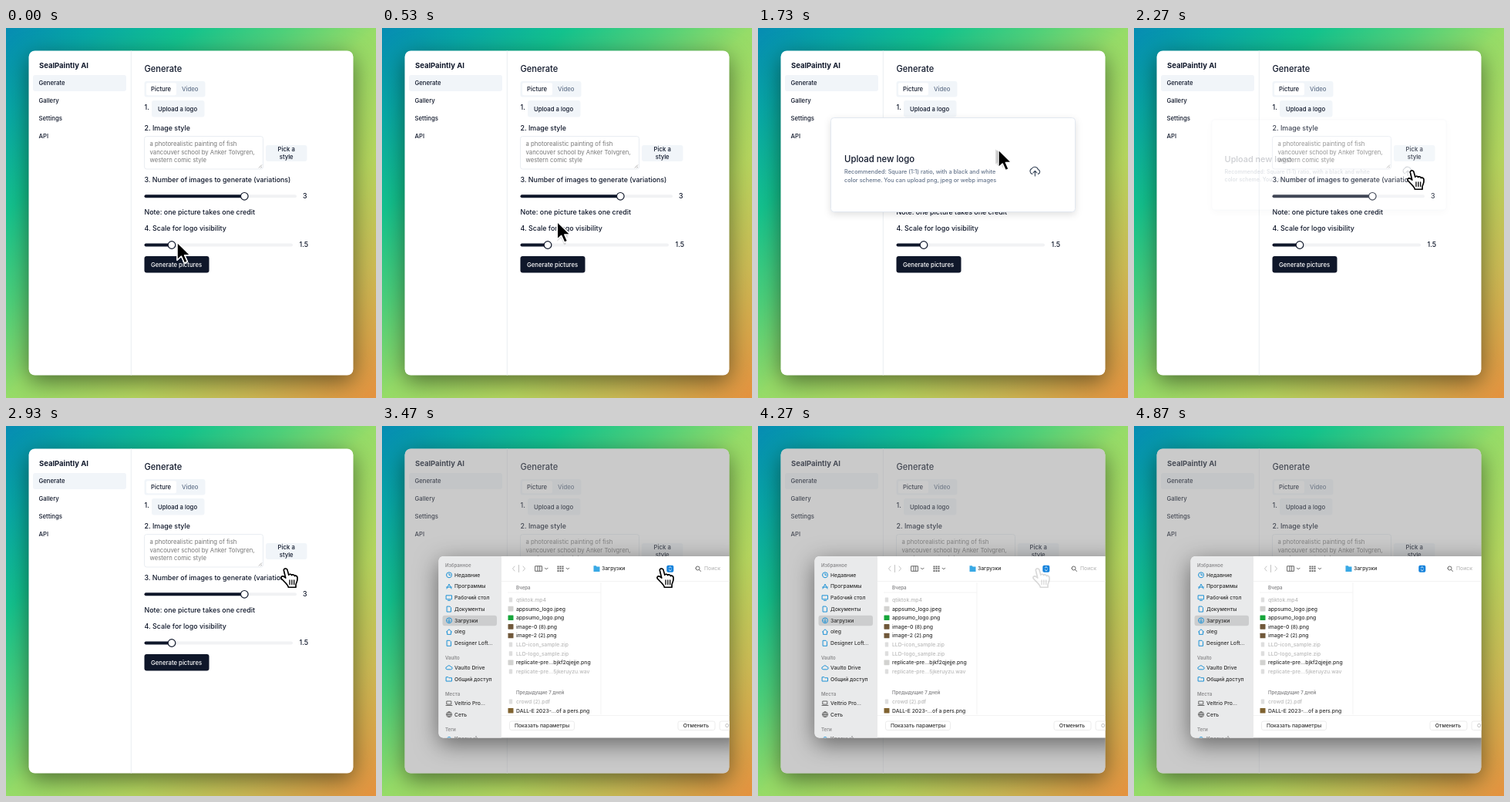
Recreate the animation shown at these times as an HTML page. Size 480x480 px, loop 4940 ms.

```html
<!DOCTYPE html>
<html lang="en">
<head>
<meta charset="utf-8">
<title>Logo picture generator</title>
<style>
  html, body { margin: 0; width: 100%; height: 100%; overflow: hidden; }
  body { background: linear-gradient(135deg, #068cb3 0, #08a8a6 12%, #14c38e 25%, #4fd17a 38%, #96dc68 50%, #b6d75f 67%, #cdbb55 82%, #e5923f 100%); }
  svg { display: block; width: 100%; height: 100%; }
  text { font: 500 7.75px Inter, "Open Sans", sans-serif; fill: #0f172a; white-space: pre; }
  .label text { font-size: 8.9px; font-weight: 450; }
  text.muted, .muted text { fill: #64748b; }
  .hint text { font-weight: 400; fill: #777; }
  .mid { text-anchor: middle; }
  .pale { fill: #f1f5f9; }
  .line { fill: none; stroke: #e9edf2; }
  .shadow { filter: drop-shadow(0 8px 15px rgba(0,0,0,.5)); }
  #picker text { font-size: 6.8px; fill: #303030; }
  #picker text.head { font-size: 6.1px; font-weight: 600; fill: #8b8b8d; }
  #picker text.off { fill: #b9b9b9; }
  .icon { fill: none; stroke: #1f93d6; stroke-width: 1; stroke-linejoin: round; stroke-linecap: round; }
  .grey { stroke: #666; }
</style>
</head>
<body>
<svg viewBox="0 0 480 480">
  <defs>
    <clipPath id="cardClip"><rect x="29.5" y="29.5" width="421" height="421" rx="8"/></clipPath>
    <clipPath id="pickerClip"><rect x="73.5" y="169" width="400" height="235.5" rx="6"/></clipPath>
    <path id="arrow" d="M0 0V23.2L5.4 18.2 9.4 27 13.4 25.2 9.6 16.7H17Z" fill="#000" stroke="#fff" stroke-width="1.6" stroke-linejoin="round"/>
    <g id="hand" stroke="#000" stroke-width="1.6" stroke-linejoin="round" stroke-linecap="round">
      <path fill="#fff" d="M-1.6 3.2C-2 .6 2 .2 2.9 2.6L4.8 9.4C5.2 7.8 8 7.8 8.5 9.6 9.4 8.4 12 8.8 12.3 10.6 13.5 9.6 16 10.6 16 13 16.4 17.5 14.6 19 14 21.6V25.2H4.4C4 21.5-1.5 17.8-4.6 14-6 11.8-3.6 10-1.6 11.4L.8 13.2Z"/>
      <path fill="none" stroke-width="1.3" d="M6 16v5.5M8.900 16v5.500M11.700 16v5.500"/>
    </g>
  </defs>

  <rect class="shadow" x="29.5" y="29.5" width="421" height="421" rx="8" fill="#fff"/>

  <g clip-path="url(#cardClip)">
    <path class="line" d="M162.3 29V451"/>
    <text x="43" y="52.3" style="font-size:9.5px;font-weight:650">SealPaintly AI</text>
    <rect class="pale" x="35" y="61" width="121" height="21" rx="3"/>
    <text x="42.5" y="73.8">Generate</text>
    <text x="42.5" y="97">Gallery</text>
    <text x="42.5" y="120">Settings</text>
    <text x="42.5" y="143.2">API</text>

    <text x="179.5" y="57" style="font-size:11.1px;font-weight:450">Generate</text>
    <rect class="pale" x="179.5" y="69" width="79" height="20.5" rx="3"/>
    <rect x="182" y="71.3" width="39" height="16" rx="2" fill="#fff"/>
    <text x="188" y="82">Picture</text>
    <text class="muted" x="228" y="82">Video</text>

    <g class="label">
      <text x="179.5" y="105.8">1.</text>
      <text x="179.5" y="132.8">2. Image style</text>
      <text x="179.5" y="200.2">3. Number of images to generate (variations)</text>
      <text x="179.5" y="242.3">Note: one picture takes one credit</text>
      <text x="179.5" y="263.3">4. Scale for logo visibility</text>
      <text x="385" y="221.3">3</text>
      <text x="380.5" y="284.4">1.5</text>
    </g>
    <rect class="pale" x="189" y="94" width="68.5" height="21.5" rx="3"/>
    <text x="197" y="107.6">Upload a logo</text>

    <rect class="line" x="179.5" y="140.5" width="154" height="42.5" rx="3"/>
    <g class="hint">
      <text x="186.5" y="153.3">a photorealistic painting of fish</text>
      <text x="186.5" y="163.8">vancouver school by Anker Tolvgren,</text>
      <text x="186.5" y="174.2">western comic style</text>
    </g>
    <path d="M328 181.5l4-4M330.5 181.5l1.5-1.5" stroke="#888" stroke-width=".7"/>
    <rect class="pale" x="337" y="152" width="53.5" height="21" rx="3"/>
    <text class="mid" x="363.7" y="159.6">Pick a</text>
    <text class="mid" x="363.7" y="170.2">style</text>

    <g id="sliders"></g>
    <rect x="179.5" y="296" width="84" height="21.5" rx="3" fill="#0f172a"/>
    <text x="188" y="309.6" style="fill:#fff">Generate pictures</text>

    <g id="upload">
      <rect x="94.5" y="116.5" width="317" height="122" rx="4" fill="#fff" stroke="#e2e8f0" style="filter:drop-shadow(0 3px 5px rgba(0,0,0,.12))"/>
      <text x="112" y="173.5" style="font-size:11.35px">Upload new logo</text>
      <g class="muted">
        <text x="112" y="189" style="font-size:7.3px">Recommended: Square (1:1) ratio, with a black and white</text>
        <text x="112" y="199.8" style="font-size:7.3px">color scheme. You can upload png, jpeg or webp images</text>
      </g>
      <path transform="translate(359.4 186)" fill="none" stroke="#334155" stroke-width="1.1" stroke-linecap="round" stroke-linejoin="round"
        d="M-3.5 3.4A3.7 3.7 0 0 1-4.4-3.5 4.6 4.6 0 0 1 4-2.4 3 3 0 0 1 4 3.4M0 6V-.5M-2.4 1.8 0-.6 2.4 1.8"/>
    </g>

    <rect id="dim" x="29" y="29" width="422" height="422" fill="rgb(137,137,137)" fill-opacity=".45"/>
    <g id="picker">
      <rect class="shadow" x="73.5" y="169" width="400" height="235.5" rx="6" fill="#fff"/>
      <g clip-path="url(#pickerClip)">
        <rect x="73" y="169" width="82" height="236" fill="#e9eaeb"/>
        <rect x="78.5" y="245.8" width="70.5" height="13.4" rx="3" fill="#cccdce"/>
        <path d="M155 201.5H474M155 375.5H474M163 216H284M284 203V374" stroke="#f0f0f0" stroke-width=".8"/>
        <g id="places"></g>
        <g id="files"></g>

        <path class="icon" style="stroke:#c4c4c4" d="M172 182l-2.5 3 2.5 3M183 182l2.5 3-2.5 3M177.5 180.5v9"/>
        <path class="icon grey" d="M199 181.8h8.5v6.5h-8.5zM202 182v6M204.7 182v6M211.5 184.2l1.8 1.8 1.8-1.8M239 184.2l1.8 1.8 1.8-1.8"/>
        <path d="M227.5 182.5h8M227.5 185.2h8M227.5 188h8" stroke="#666" stroke-width="1.8" stroke-dasharray="2 1"/>
        <path d="M274.5 181.2h3.2l1 1.2h3.8v6.6h-8z" fill="#39a9e5"/>
        <text x="285" y="187.4">Загрузки</text>
        <rect x="369.3" y="180.7" width="9" height="9" rx="2" fill="#1683dc"/>
        <path d="M372 184.3l1.8-1.7 1.8 1.7M372 186.2l1.8 1.7 1.8-1.7" fill="none" stroke="#fff" stroke-width=".9"/>
        <path class="icon grey" d="M407 184.5a2.5 2.5 0 1 0 5 0a2.5 2.5 0 1 0-5 0M411.5 186.5l2 2"/>
        <text class="off" x="418" y="187.4">Поиск</text>

        <g fill="#fff" stroke="#e8e8e8" stroke-width=".8">
          <rect x="165.5" y="383" width="84" height="11.5" rx="2.5"/>
          <rect x="384" y="383" width="48" height="11.5" rx="2.5"/>
          <rect x="438" y="383" width="40" height="11.5" rx="2.5"/>
        </g>
        <text class="mid" x="207.5" y="391.2">Показать параметры</text>
        <text class="mid" x="407.5" y="391.2">Отменить</text>
        <text class="off" x="445" y="391.2">Открыть</text>
      </g>
    </g>
  </g>
  <g id="cursor"><use/><use/><use/></g>
</svg>

<script>
const $ = id => document.getElementById(id);
const label = (x, y, text, kind = '') => `<text class="${kind}" x="${x}" y="${y + 2.4}">${text}</text>`;

const slider = (y, end, knob) => `
  <path d="M181.5 ${y}H${end - 2}" stroke="#f1f2f4" stroke-width="4" stroke-linecap="round"/>
  <path d="M181.5 ${y}H${knob}" stroke="#0f172a" stroke-width="4" stroke-linecap="round"/>
  <circle cx="${knob}" cy="${y}" r="4.8" fill="#fff" stroke="#0f172a" stroke-width="1.2"/>`;
$('sliders').innerHTML = slider(218.3, 377, 309.3) + slider(281.5, 372, 215);

const ring = 'M-3.5 0a3.5 3.5 0 1 0 7 0a3.5 3.5 0 1 0-7 0';
const icons = {
  clock: ring + 'M0-2V0H2',
  apps: 'M-3 3 0-3 3 3M-3.5 1H3.5',
  desktop: 'M-3.5-3h7v5h-7zM-1.5 3.5h3',
  page: 'M-2.5-3.5H1L2.5-2V3.5h-5z',
  download: ring + 'M0-2V2M-1.5.5 0 2 1.5.5',
  home: 'M-3.5 0 0-3.3 3.5 0M-2.5-.5V3.3h5V-.5',
  cloud: 'M-2.5 2.3a1.7 1.7 0 0 1 0-3.4a2.5 2.5 0 0 1 4.7 0a1.7 1.7 0 0 1 .5 3.4z',
  folder: 'M-3.5-2.5h2.5l1 1h3.5v4.3h-7z',
  laptop: 'M-2.8-2.5h5.6v4h-5.6zM-4 3h8',
  globe: ring + 'M-3.5 0h7M0-3.5Q-3 0 0 3.5Q3 0 0-3.5',
  tag: 'M-2.5 0a2.5 2.5 0 1 0 5 0a2.5 2.5 0 1 0-5 0'
};
const groups = [
  ['Избранное', 181, 193.3, [['clock', 'Недавние'], ['apps', 'Программы'], ['desktop', 'Рабочий стол'],
    ['page', 'Документы'], ['download', 'Загрузки'], ['home', 'oleg'], ['page', 'Designer Loft…']]],
  ['Vaulto', 301, 313.5, [['cloud', 'Vaulto Drive'], ['folder', 'Общий доступ']]],
  ['Места', 347.3, 359.5, [['laptop', 'Veltrio Pro…'], ['globe', 'Сеть']]],
  ['Теги', 394, 406, [['tag', 'Красный']]]
];
$('places').innerHTML = groups.map(([title, headY, top, items]) =>
  label(82, headY, title, 'head') + items.map(([icon, name], i) => {
    const y = top + i * 14.75;
    const grey = icon === 'laptop' || icon === 'globe' ? 'grey' : '';
    return `<path class="icon ${grey}" transform="translate(87 ${y})" d="${icons[icon]}"/>` + label(94, y, name);
  }).join('')).join('');

// A null colour marks an unavailable file.
const sections = [
  ['Вчера', 209.5, 225.5, [['qtiktok.mp4', null], ['appsumo_logo.jpeg', '#d2d2d0'], ['appsumo_logo.png', '#17a63b'],
    ['image-0 (8).png', '#70583a'], ['image-2 (2).png', '#70583a'], ['LLD-icon_sample.zip', null],
    ['LLD-logo_sample.zip', null], ['replicate-pre…bjkf2qjejje.png', '#d2d2d0'], ['replicate-pre…5jkeruyzu.wav', null]]],
  ['Предыдущие 7 дней', 345.5, 357.6, [['crowd (2).pdf', null], ['DALL-E 2023-…of a pers.png', '#806330']]]
];
const thumbnail = (y, color) => color
  ? `<rect x="163.5" y="${y - 3.3}" width="7" height="6.6" rx=".6" fill="${color}"/>`
  : `<rect x="164.8" y="${y - 3}" width="4.4" height="6" rx=".6" fill="#dedede"/>`;
$('files').innerHTML = sections.map(([title, headY, top, items]) =>
  label(174, headY, title, 'head') + items.map(([name, color], i) => {
    const y = top + i * 11.62;
    return thumbnail(y, color) + label(174, y, name, color ? '' : 'off');
  }).join('')).join('');

const LOOP = 4940;
const ramp = (t, from, to) => Math.min(1, Math.max(0, (t - from) / (to - from)));
const ease = u => u * u * (3 - 2 * u);
const progress = (t, from, to) => ease(ramp(t, from, to));

function cursorAt(t) {
  const rise = progress(t, 400, 920);
  const cross = progress(t, 1400, 1950);
  const drift = progress(t, 2350, 2850);
  return [
    222 + 11 * Math.sin(Math.PI * rise) + 138 * cross + 2 * drift,
    278 - 169 * rise + 75 * cross
  ];
}

const trail = [...$('cursor').children];
function draw(t) {
  const open = ramp(t, 1090, 1290) * (1 - ramp(t, 2140, 2305));
  const scale = 0.95 + 0.05 * open;
  $('upload').setAttribute('opacity', open);
  $('upload').setAttribute('transform', `translate(253 177.5) scale(${scale}) translate(-253 -177.5)`);

  const picker = progress(t, 3250, 3450);
  $('dim').setAttribute('opacity', picker);
  $('picker').setAttribute('opacity', picker);

  // Earlier positions beneath the pointer soften fast movement.
  const shape = t < 1800 ? '#arrow' : '#hand';
  trail.forEach((copy, i) => {
    const age = trail.length - 1 - i;
    const [x, y] = cursorAt(t - age * 6);
    copy.setAttribute('href', shape);
    copy.setAttribute('transform', `translate(${x} ${y})`);
    copy.setAttribute('opacity', [1, 0.35, 0.2][age]);
  });
  $('cursor').setAttribute('opacity', 1 - ramp(t, 4100, 4300));
}

function tick() {
  draw(performance.now() % LOOP);
  requestAnimationFrame(tick);
}
tick();
</script>
</body>
</html>
```
